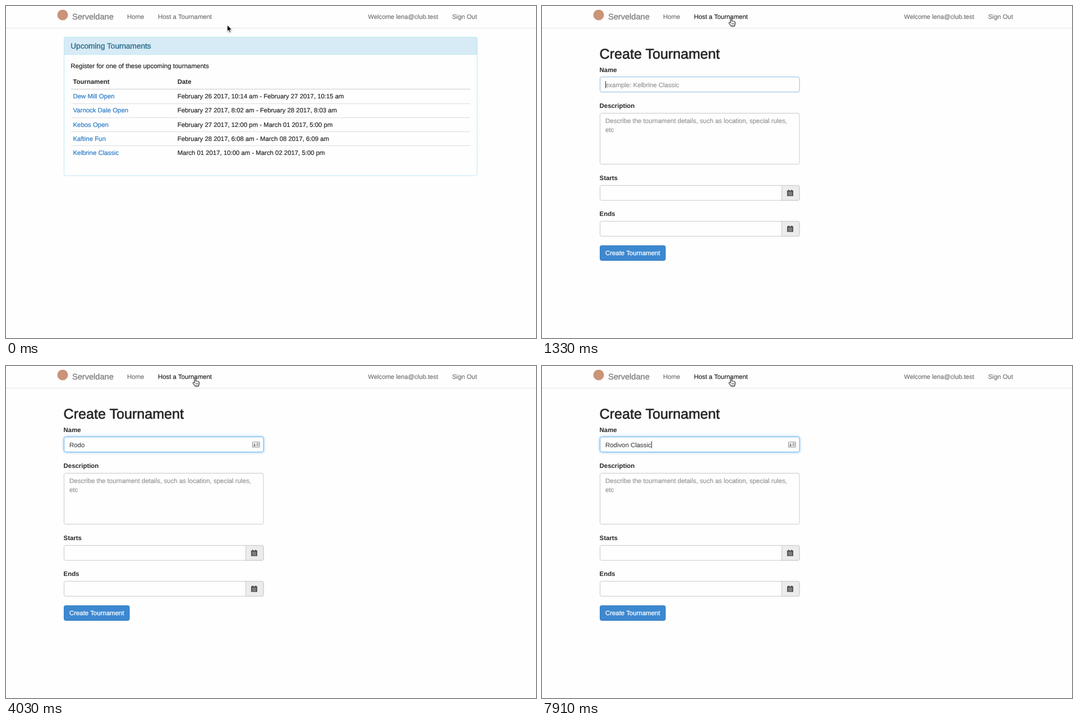
An HTML page for the animation above (8 s loop, 945x593 px).

```html
<!DOCTYPE html>
<html lang="en">
<head>
<meta charset="utf-8">
<title>Tournament form</title>
<style>
html, body { margin: 0; width: 100%; height: 100%; overflow: hidden; background: #fefefe; }
svg { display: block; font-family: "Liberation Sans", Arial, sans-serif; }
text { white-space: pre; text-rendering: geometricPrecision; }
.glow { filter: drop-shadow(0 0 2.5px rgba(82, 168, 236, .65)); }
.cursor { filter: drop-shadow(0 1px 1px rgba(0, 0, 0, .35)); }
</style>
</head>
<body>
<svg id="stage" width="945" height="593" viewBox="0 0 945 593"></svg>
<script>
const INK = '#262626', GREY = '#747474', LINK = '#2a7ac6', HINT = '#969696';

// A thin outline in the text colour gives the slightly heavier lettering.
const text = (x, y, str, { size = 11.4, fill = INK, heavy = .2, extra = '' } = {}) =>
  `<text x="${x}" y="${y}" font-size="${size}" fill="${fill}" color="${fill}"
    stroke="${fill}" stroke-width="${heavy}" ${extra}>${str}</text>`;
const bold = (x, y, str) => text(x, y, str, { heavy: 0, extra: 'font-weight="700"' });
const box = (x, y, w, h, fill, stroke, extra = '') =>
  `<rect x="${x}" y="${y}" width="${w}" height="${h}" rx="3" fill="${fill}" stroke="${stroke}" ${extra}/>`;
const line = (y, x1, x2, color, width = 1) =>
  `<path d="M${x1} ${y}H${x2}" stroke="${color}" stroke-width="${width}"/>`;

const nav = line(39.5, 0, 945, '#e5e5e5') +
  '<circle cx="101" cy="16" r="9.5" fill="#c99478"/>' +
  text(118, 23.5, 'Serveldane', { size: 14.6, fill: GREY }) +
  text(216, 22.7, 'Home', { fill: GREY }) +
  text(271, 22.7, 'Host a Tournament', { fill: GREY, extra: 'id="host"' }) +
  text(645.5, 22.7, 'Welcome lena@club.test', { size: 11.3, fill: GREY }) +
  text(795.5, 22.7, 'Sign Out', { fill: GREY });

const events = [
  ['Dew Mill Open', 'February 26 2017, 10:14 am - February 27 2017, 10:15 am'],
  ['Varnock Dale Open', 'February 27 2017, 8:02 am - February 28 2017, 8:03 am'],
  ['Kebos Open', 'February 27 2017, 12:00 pm - March 01 2017, 5:00 pm'],
  ['Kaftine Fun', 'February 28 2017, 6:08 am - March 08 2017, 6:09 am'],
  ['Kelbrine Classic', 'March 01 2017, 10:00 am - March 02 2017, 5:00 pm'],
];
const rows = events.map(([name, date], i) => {
  const y = 165.3 + i * 25.15;
  return text(119.5, y, name, { fill: LINK }) + text(305.8, y, date, { size: 11.36 }) +
    (i ? line(Math.floor(y - 16.3) + .5, 116, 828, '#ddd') : '');
}).join('');

const list = box(103.5, 55.5, 736.6, 247.5, '#fefefe', '#bce8f1') +
  '<path d="M103.5 86.5V58.5a3 3 0 0 1 3-3H837.1a3 3 0 0 1 3 3V86.5Z" fill="#d7ebf6" stroke="#bce8f1"/>' +
  text(115.3, 76.4, 'Upcoming Tournaments', { size: 13.6, fill: '#31708f', heavy: .45 }) +
  text(115.3, 111, 'Register for one of these upcoming tournaments', { size: 11.53 }) +
  bold(119.5, 139.3, 'Tournament') + bold(305.8, 139.3, 'Date') +
  line(148.5, 116, 828, '#d8d8d8', 1.6) + rows;

const calendar = y => `<g transform="translate(437 ${y})">
  <path d="M0 1.2H11V11.2H0ZM2 0h1.6v2H2ZM7.4 0H9v2H7.4Z" fill="#484848"/>
  <path d="M.8 4H10.2M.8 6.4H10.2M.8 8.8H10.2M3.3 4V10.4M5.5 4V10.4M7.7 4V10.4" stroke="#ddd" stroke-width=".45"/></g>`;
const dateField = (y, label) => bold(102.6, y - 9.2, label) +
  box(103.5, y, 355.6, 26.7, '#fefefe', '#c8c8c8') +
  `<path d="M427.5 ${y}H456.1a3 3 0 0 1 3 3v20.7a3 3 0 0 1-3 3H427.5Z" fill="#ececec" stroke="#c8c8c8"/>` +
  calendar(y + 7.7);

const form = text(102.6, 93.5, 'Create Tournament', { size: 25.1, heavy: .65 }) +
  bold(102.6, 118.2, 'Name') +
  box(103.5, 126.7, 355.6, 27, '#fefefe', '#66afe9', 'id="field"') +
  text(113, 144.5, 'example: Kelbrine Classic', { size: 11.45, fill: HINT, extra: 'id="hint"' }) +
  text(113, 144.5, '', { fill: '#505050', extra: 'id="typed"' }) +
  '<rect id="caret" y="134" width="1" height="13" fill="#333"/>' +
  `<g id="card" fill="none" stroke="#8c8c8c" stroke-width="1.1"><rect x="439.5" y="135.8" width="12.7" height="9.2" rx="1"/>
    <path d="M446.5 138.4h4M446.5 140.4h4M446.5 142.4h4"/>
    <path d="M441 143.5v-1.2l1.2-.8a1.5 1.8 0 1 1 1.8 0l1.2.8v1.2Z" fill="#8c8c8c" stroke="none"/></g>` +
  bold(102.6, 182.2, 'Description') +
  box(103.5, 191.5, 355.6, 91, '#fefefe', '#c8c8c8') +
  text(113, 208.6, 'Describe the tournament details, such as location, special rules,', { size: 11.48, fill: HINT }) +
  text(113, 224.8, 'etc', { fill: HINT }) +
  dateField(320.5, 'Starts') + dateField(384.5, 'Ends') +
  box(103.5, 428, 116.5, 26.5, '#3d88d0', '#3079bf') +
  text(113, 445.4, 'Create Tournament', { size: 11.4, fill: '#fff', heavy: .3 });

const arrow = '<path id="arrow" d="M0 0V11.5L2.7 9 4.4 13 6.3 12.2 4.6 8.3H8.2Z" fill="#000" stroke="#fff" stroke-width=".9"/>';
const hand = `<g id="hand" stroke="#111" stroke-width="1"><path fill="#fff" d="M-1.3 8V1a1.2 1.2 0 0 1 2.4 0V5q1-.8 2.1.2 1.2-.6 2 .5 1.6-.3 1.6 1.2V9q0 2-1 3V13.5H-.5q-.3-1.2-2.2-3.2-1.8-2-1.4-2.8 1-.9 2.8.5Z"/>
  <path d="M.8 8.2V11M2.6 8.2V11M4.4 8.2V11" stroke-width=".7"/></g>`;

document.getElementById('stage').innerHTML =
  `${nav}<g id="list">${list}</g><g id="form">${form}</g><g id="cursor" class="cursor">${arrow}${hand}</g>`;

const el = id => document.getElementById(id);
const show = (id, on) => el(id).setAttribute('display', on ? 'inline' : 'none');

const moves = [150, 300, 450, 590, 730, 880];
const NAME = 'Rodivon Classic';
const typo = 'Rodo';
// [time, text, caret visible]
const typing = [
  [0, '', 1], [1780, '', 0], [2230, '', 1],
  [2680, NAME.slice(0, 1), 1], [2980, NAME.slice(0, 2), 1], [3280, NAME.slice(0, 3), 1],
  [3580, typo, 1], [4030, typo, 0],
  [4630, NAME.slice(0, 3), 1], [4780, NAME.slice(0, 4), 1], [4920, NAME.slice(0, 5), 1],
  [5370, NAME.slice(0, 5), 0],
  [5660, NAME.slice(0, 4), 1], [5810, NAME.slice(0, 5), 1], [5960, NAME.slice(0, 6), 1],
  [6110, NAME.slice(0, 7), 1], [6560, NAME.slice(0, 7), 0],
  [6860, NAME.slice(0, 9), 1], [7010, NAME.slice(0, 10), 1], [7160, NAME.slice(0, 11), 1],
  [7310, NAME.slice(0, 12), 1], [7460, NAME.slice(0, 13), 1],
  [7760, NAME.slice(0, 14), 1], [7910, NAME, 1],
];

function draw(t) {
  const p = moves.filter(m => t >= m).length / moves.length;
  const ease = p * p * (3 - 2 * p);
  const x = 394.5 - 57 * ease, y = 34 - 11.8 * ease;
  const over = x < 381;
  el('cursor').setAttribute('transform', `translate(${x} ${y})`);
  show('arrow', !over);
  show('hand', over);
  for (const paint of ['fill', 'stroke']) el('host').setAttribute(paint, over ? INK : GREY);

  const editing = t >= 1330;
  show('list', !editing);
  show('form', editing);
  if (!editing) return;

  const focused = t >= 1480;
  el('field').setAttribute('class', focused ? 'glow' : '');
  el('field').setAttribute('stroke', focused ? '#66afe9' : '#8abbe2');
  const [, str, caret] = typing.findLast(step => t >= step[0]);
  el('typed').textContent = str;
  show('hint', !str);
  show('card', t >= 2380);
  show('caret', caret);
  const end = str ? el('typed').getComputedTextLength() : 0;
  el('caret').setAttribute('x', Math.round(113 + end));
}

function tick() {
  draw(performance.now() % 8000);
  requestAnimationFrame(tick);
}
tick();
</script>
</body>
</html>
```
